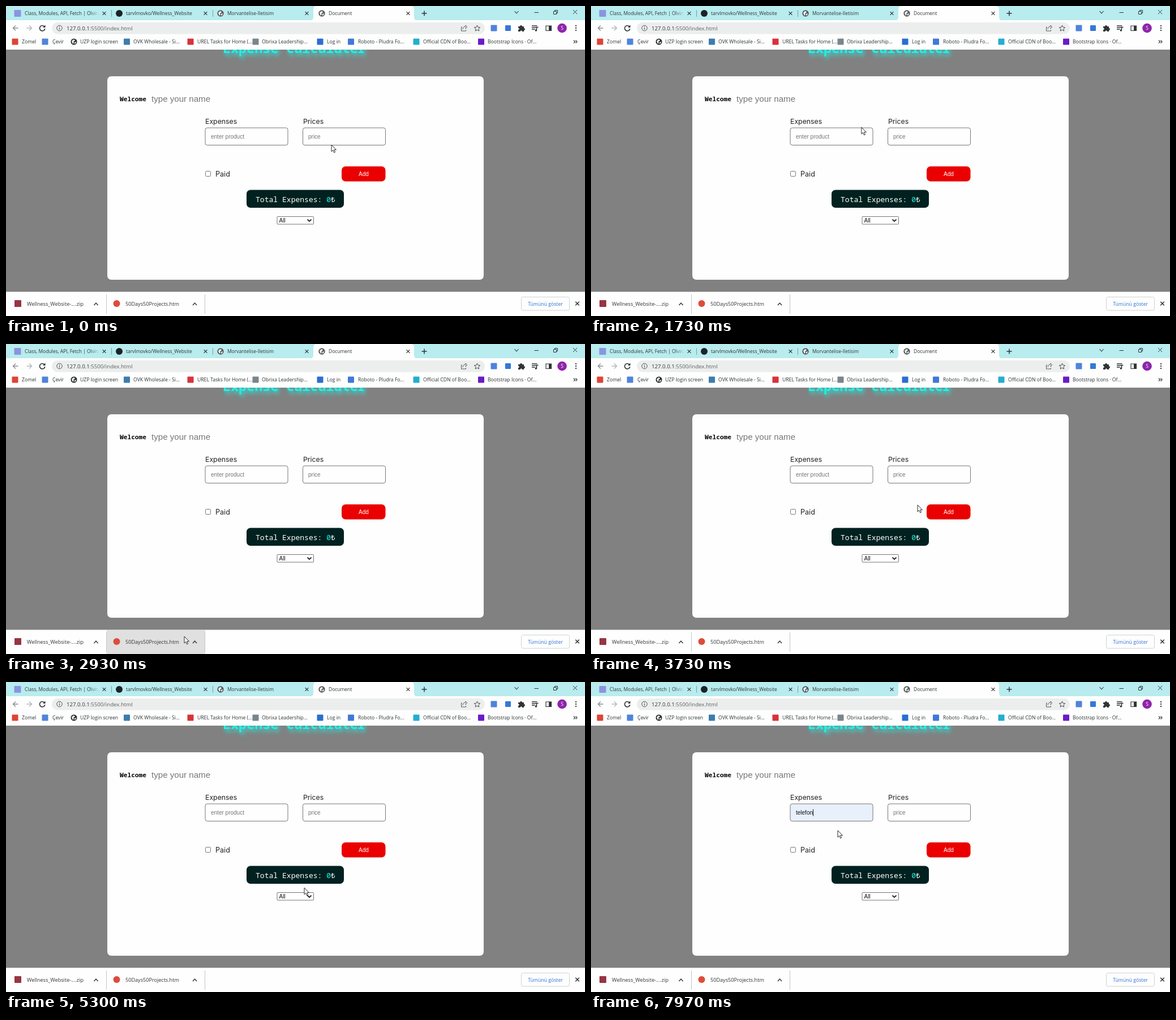
Recreate the animation shown at these times as an HTML page. Size 1023x547 px, loop 8000 ms.

```html
<!DOCTYPE html>
<html lang="en">
<head>
<meta charset="utf-8">
<title>Expense form</title>
<style>
html, body { margin: 0; width: 100%; height: 100%; overflow: hidden; background: #818181; }
svg { display: block; width: 100%; height: 100%; }
text { white-space: pre; }
.ui { font-family: "Open Sans", "Noto Sans", sans-serif; }
.mono { font-family: "Noto Sans Mono", "DejaVu Sans Mono", monospace; }
.arial { font-family: "Liberation Sans", Arial, sans-serif; }
.geo { font-family: Inter, sans-serif; }
</style>
</head>
<body>
<svg id="stage" viewBox="0 0 1023 547" xmlns="http://www.w3.org/2000/svg"></svg>
<script>
const LOOP = 8000;
const INK = '#303436', GREY = '#767676', CYAN = '#22f0e4', PAPER = '#fdfefd';

// Drawing helpers
const rect = (x, y, w, h, fill, r = 0, more = '') =>
  `<rect x="${x}" y="${y}" width="${w}" height="${h}" rx="${r}" fill="${fill}" ${more}/>`;
const dot = (x, y, r, fill) => `<circle cx="${x}" cy="${y}" r="${r}" fill="${fill}"/>`;
const line = (d, color = INK, w = 1.2, more = '') =>
  `<path d="${d}" fill="none" stroke="${color}" stroke-width="${w}" ${more}/>`;
const shape = (d, fill = INK) => `<path d="${d}" fill="${fill}"/>`;
const text = (x, y, size, str, cls = 'ui', fill = INK, more = '') =>
  `<text x="${x}" y="${y}" font-size="${size}" class="${cls}" fill="${fill}" ${more}>${str}</text>`;
const square = (x, y, fill, s = 11) => rect(x - s / 2, y - s / 2, s, s, fill, 1);
const cross = (x, y, r = 3, w = 1.2) =>
  line(`M${x - r} ${y - r}l${2 * r} ${2 * r}m0 ${-2 * r}l${-2 * r} ${2 * r}`, INK, w);
const chevron = (x, y, h, color = INK, w = 1.4) =>
  line(`M${x - 3.5} ${y - h / 2}l3.5 ${h}l3.5 ${-h}`, color, w);
const globe = (x, y, r, color) => dot(x, y, r, color) +
  shape(`M${x - 4} ${y - 1}l3-3 3 1-1 2-2 1 1 2-2 2zM${x + 1} ${y + 1}l3-1-1 3-2 1z`, '#f5f8f8');

function tabs() {
  let s = rect(0, 0, 1023, 25.5, '#b8ecee');
  s += shape('M537 25.5q6 0 6-6V6q0-6 6-6h166q6 0 6 6v13.500q0 6 6 6z', PAPER);
  s += square(20.5, 13, '#8b94e0', 12) + dot(200, 13, 6, '#1d2326');
  s += globe(379, 13, 5.7, '#565b5f') + globe(558, 13, 5.7, '#565b5f');
  s += `<g clip-path="url(#tabClip)">` + text(33, 16, 8.45, 'Class, Modules, API, Fetch | Olvira') + '</g>';
  s += rect(148, 4, 17, 18, 'url(#fade)');
  s += text(212, 16, 8.45, 'tarvlmovko/Wellness_Website');
  s += text(391, 16, 8.45, 'Morvantelise-Iletisim');
  s += text(570, 16, 8.45, 'Document');
  for (const x of [173.5, 352.5, 531.5, 710.5]) s += cross(x, 13, 2.9);
  s += line('M186.500 7v12M365.500 7v12', '#7f9da0', 1);
  s += line('M734.500 13h9M739 8.500v9', INK, 1.5);
  s += chevron(902, 11, 4, INK, 1.1) + line('M933.500 11.500h7.500', INK, 1);
  s += line('M967.500 9.500h5v5h-5zM969.500 9.500v-2h5v5h-2', INK, 1);
  return s + cross(1005.500, 10.500, 3.6, 1);
}

function toolbar() {
  let s = rect(0, 25, 1023, 52, PAPER) + rect(81, 29, 765, 20.500, '#ebeeec', 10);
  s += line('M21.500 39h-9m4.500-4.500l-4.500 4.500 4.500 4.500', '#8a8e90', 1.4);
  s += line('M36.500 39h9m-4.500-4.500l4.500 4.500-4.500 4.500', '#b4b8ba', 1.4);
  s += line('M68 36.500a4.700 4.700 0 1 0 .8 3.500', INK, 1.6) + shape('M69.500 33.500v4.500h-4.500z');
  s += `<circle cx="94.500" cy="39" r="4.700" fill="none" stroke="#4c5052"/>` + line('M94.500 38.500v3M94.500 36v1.300', '#4c5052');
  s += text(107, 42.5, 9.65, '127.0.0.1<tspan fill="#5b6062">:5500/index.html</tspan>');
  s += line('M806 37h-1.500v7h8v-2M807 41c0-3 2-5 5-5v-2l2.500 3-2.500 3v-2', '#55595b', 1);
  s += line('M832.500 34l1.500 3.400 3.700.4-2.800 2.500.8 3.700-3.200-1.900-3.200 1.900.8-3.700-2.800-2.500 3.700-.4z', '#45494b', 1);
  s += square(862, 39, '#4f83dc') + square(887, 39, '#3478d6', 10);
  s += shape('M905 36h3a2 2 0 1 1 4 0h3v3a2 2 0 1 1 0 4v2h-3a1.700 1.700 0 0 0-3.400 0H905v-3a1.700 1.700 0 0 0 0-3.400z');
  s += line('M929 35h9.500M929 38h9.500M929 41h5.500M937.500 43.500v-6h3', INK, 1.4) + dot(936.300, 43, 1.7, INK);
  s += line('M954 35h9.500v8.500h-9.500z', INK, 1.2) + rect(959, 35, 4.5, 8.5, INK);
  s += dot(982.500, 39, 8.3, '#8e24aa') + text(982.500, 42, 8.500, 'S', 'ui', '#fff', 'text-anchor="middle"');
  for (const y of [35, 39, 43]) s += dot(1007, y, 1.15, INK);
  return s;
}

function bookmarks() {
  const items = [
    [16, 28, 'Zomel', '#dc4436'], [69, 82, 'Çevir', '#4f83dc'], [120, 131, 'UZP login screen'],
    [213.500, 225, 'OVK Wholesale - Si...', '#3c7cae'], [326, 338, 'UREL Tasks for Home (...', '#d8323c'],
    [441, 452, 'Obrixa Leadership...', '#7a858c'], [555, 567, 'Log in', '#2a6fd0'],
    [609.500, 622, 'Roboto - Pludra Fo...', '#3f79d8'], [725, 737, 'Official CDN of Boo...', '#22aed1'],
    [839.500, 851, 'Bootstrap Icons · Of...', '#6a1bc8']
  ];
  return items.map(([ix, tx, label, color]) =>
    (color ? square(ix, 63, color) : globe(ix, 63, 5.5, '#26292b')) + text(tx, 66, 8.65, label)
  ).join('') + line('M1003 60.500l2.500 2.500-2.500 2.500m3.500-5l2.500 2.500-2.500 2.500');
}

function field(id, x) {
  return rect(x, 215, 146, 30.5, PAPER, 3.5, `id="${id}" stroke="${GREY}"`);
}

function page() {
  let s = rect(0, 77, 1023, 428, '#818181');
  s += '<g clip-path="url(#pageClip)">' + text(383, 83, 23.4, 'Expense Calculater', 'mono', CYAN,
    'font-weight="600" filter="url(#glow)"') + '</g>';
  s += rect(179, 124, 665, 359, PAPER, 7);
  s += text(201, 168, 11.2, 'Welcome', 'mono', '#080808', 'font-weight="700"');
  s += text(257, 169, 15.1, 'type your name', 'arial', GREY);
  s += text(352, 208, 12.3, 'Expenses', 'geo', '#222') + text(525, 208, 12.3, 'Prices', 'geo', '#222');
  s += field('product', 352) + field('price', 524.5);
  s += `<text id="entry" x="362" y="234" font-size="10" class="arial"></text>`;
  s += text(534, 234, 10, 'price', 'arial', GREY);
  s += `<path id="caret" d="M0 224.500v12" stroke="#111" stroke-width="1"/>`;
  s += rect(352.5, 291.5, 9, 9, '#fff', 1.8, `stroke="${GREY}"`) + text(370, 300.5, 12.6, 'Paid', 'geo', '#222');
  s += rect(593, 283, 77.5, 26.5, '#ea0000', 7);
  s += text(632, 300, 10, 'Add', 'arial', '#fff', 'text-anchor="middle"');
  s += rect(425, 324.5, 172, 31.5, '#00211f', 7);
  s += text(441, 346, 13.05, `Total Expenses: <tspan fill="${CYAN}">0</tspan>₺`, 'mono', '#fff');
  s += rect(479, 371.5, 64.5, 13.5, '#fff', 1, `stroke="${GREY}"`);
  s += text(482.5, 382, 10, 'All', 'arial', '#111') + chevron(536, 378.3, 3.2, '#111', 1.7);
  return s;
}

function shelf() {
  let s = rect(0, 504, 1023, 43, PAPER) + line('M0 504.500h1023', '#d5d8d6', 1);
  s += rect(177.5, 505, 174.5, 42, '#dfe0df', 0, 'id="hover"');
  s += line('M177.500 509v34M351.500 509v34', '#c3c7c8', 1);
  s += square(21, 525, '#963544', 12) + dot(195.500, 525, 6, '#de4b3c');
  s += text(37, 529, 9.1, 'Wellness_Website-....zip') + text(211, 529, 9.1, '50Days50Projects.htm');
  s += chevron(159, 526, -4) + chevron(333.5, 526, -4);
  s += rect(910.5, 513.5, 85, 23.5, PAPER, 3, 'stroke="#cfd3d6"');
  s += text(953, 528.5, 8.7, 'Tümünü göster', 'ui', '#2f6fd6', 'text-anchor="middle"');
  return s + cross(1009.500, 525, 3.3, 1.5);
}

const defs = `<defs>
  <clipPath id="tabClip"><rect x="30" y="0" width="134" height="25"/></clipPath>
  <clipPath id="pageClip"><rect y="77" width="1023" height="427"/></clipPath>
  <linearGradient id="fade"><stop stop-color="#b8ecee" stop-opacity="0"/><stop offset="1" stop-color="#b8ecee"/></linearGradient>
  <filter id="glow" x="-10%" y="-50%" width="120%" height="220%">
    <feDropShadow dx="3" dy="5" stdDeviation="3.500" flood-color="#22f0e4" flood-opacity=".75"/>
  </filter></defs>`;
const pointer = `<path id="arrow" d="M0 0v11.800l2.700-2.400 1.900 4.300 2-.9-1.900-4.100h3.700z" fill="#fff" stroke="#111" stroke-width=".9"/>
  <path id="beam" d="M-3-6.500h2.200l.8.700.8-.7h2.200M0-5.800v11.600M-3 6.500h2.200l.8-.7.8.7h2.200" fill="none" stroke-width="1.100"/>`;

document.getElementById('stage').innerHTML =
  defs + page() + tabs() + toolbar() + bookmarks() + shelf() + pointer;

const $ = id => document.getElementById(id);
const [product, entry, caret, hover, arrow, beam] =
  ['product', 'entry', 'caret', 'hover', 'arrow', 'beam'].map($);

// Pointer stops: time, x, y
const path = [
  [0, 575, 245], [30, 575, 245], [830, 520, 250], [1130, 502, 232], [1460, 502, 232],
  [1730, 478, 214], [2230, 400, 380], [2930, 315, 516], [3070, 318, 513], [3730, 577, 284],
  [3900, 575, 290], [4730, 525, 343], [5200, 525, 343], [5300, 527, 363], [5450, 533, 378],
  [5700, 500, 330], [6000, 438, 240], [6100, 433, 224], [6240, 433, 224], [6360, 432, 220],
  [6600, 431, 225], [7000, 431, 225], [7170, 427, 248], [7440, 427, 248], [7560, 436, 284],
  [7700, 437, 261], [7900, 437, 261], [7970, 436, 262], [8000, 436, 262]
];

// Tangent is flat at turning points and at rests
function slope(i, k) {
  const a = path[i - 1], b = path[i], c = path[i + 1];
  if (!a || !c || (b[k] - a[k]) * (c[k] - b[k]) <= 0) return 0;
  return (c[k] - a[k]) / (c[0] - a[0]);
}

function pointerAt(t) {
  let i = 0;
  while (i < path.length - 2 && t >= path[i + 1][0]) i++;
  const a = path[i], b = path[i + 1], d = b[0] - a[0], u = (t - a[0]) / d;
  return [1, 2].map(k => {
    const w = u * u * (3 - 2 * u);
    return a[k] + (b[k] - a[k]) * w +
      d * u * (1 - u) * ((1 - u) * slope(i, k) - u * slope(i + 1, k));
  });
}

const inside = (x, y, l, t, r, b) => x >= l && x <= r && y >= t && y <= b;
const show = (el, on) => el.setAttribute('visibility', on ? 'visible' : 'hidden');

function render(t) {
  const [x, y] = pointerAt(t);
  const onTotal = inside(x, y, 441, 333, 582, 350);
  const onText = onTotal || inside(x, y, 352, 215, 498, 246) || inside(x, y, 524, 215, 670, 244);
  const at = `translate(${x.toFixed(2)} ${y.toFixed(2)})`;
  arrow.setAttribute('transform', at);
  beam.setAttribute('transform', at);
  beam.setAttribute('stroke', onTotal ? '#fff' : '#111');
  show(arrow, !onText);
  show(beam, onText);
  show(hover, inside(x, y, 178, 505, 352, 547));

  const preview = t >= 7560, filled = t >= 7900;
  product.setAttribute('fill', preview ? '#e8f0fc' : PAPER);
  entry.textContent = preview ? 'telefon' : 'enter product';
  entry.setAttribute('fill', preview ? '#111' : GREY);
  show(caret, filled || (t >= 6500 && t < 7000));
  caret.setAttribute('transform', `translate(${filled ? 392.5 : 362.5} 0)`);
}

function tick() {
  render(performance.now() % LOOP);
  requestAnimationFrame(tick);
}
tick();
</script>
</body>
</html>
```
